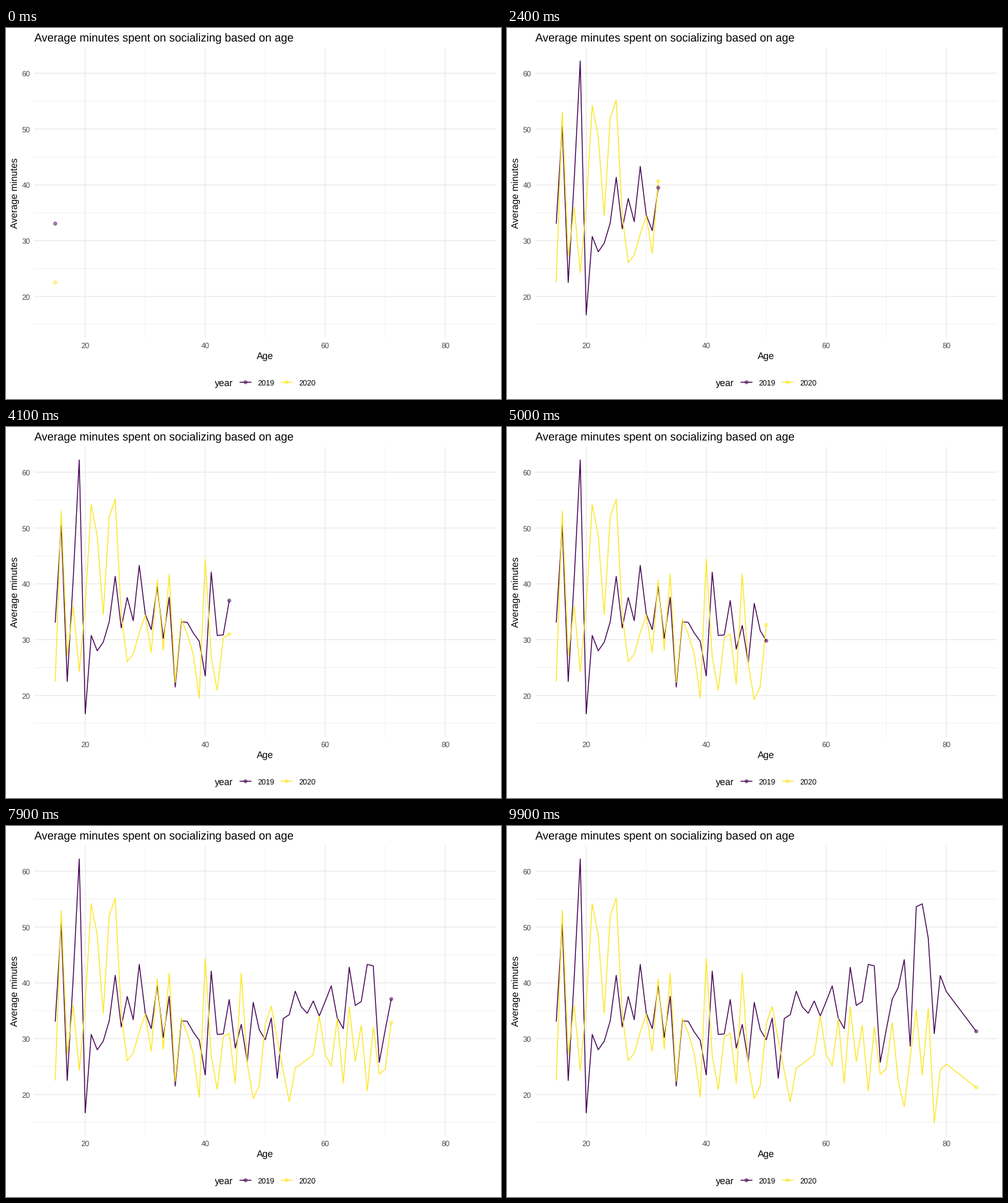
A matplotlib script that plays this animation: 768x576 px, repeating every 10 s.

```python
import matplotlib.pyplot as plt
import numpy as np
from matplotlib.animation import FuncAnimation
from matplotlib.patches import Circle

plt.rcParams.update({
    "font.family": "Liberation Sans",
    "text.hinting": "none",
    "lines.solid_capstyle": "butt",
    "lines.solid_joinstyle": "round",
})

W, H, DPI = 768, 576, 96
FRAMES, INTERVAL = 100, 100
LEFT, RIGHT, TOP, BOTTOM = 43.8, 760.67, 30.7, 481.4
PT = 72 / DPI  # points per pixel
COLORS = {"2019": "#440154", "2020": "#FDE725"}

ages = np.append(np.arange(15, 81), 85)
minutes = {
    "2019": [
        33.05, 50.5, 22.5, 41.0, 62.2, 16.7, 30.75, 28.0, 29.55, 33.2,
        41.35, 32.1, 37.55, 33.4, 43.3, 34.6, 31.8, 39.5, 30.2, 37.6,
        21.5, 33.2, 33.1, 31.2, 29.7, 23.5, 42.1, 30.75, 30.85, 37.0,
        28.3, 32.55, 25.9, 36.5, 31.6, 29.8, 33.7, 22.9, 33.6, 34.3,
        38.5, 35.7, 34.55, 36.75, 34.05, 36.7, 39.45, 33.7, 31.8, 42.8,
        35.95, 36.65, 43.3, 43.05, 25.75, 31.6, 37.1, 39.15, 44.15, 28.65,
        53.65, 54.15, 48.0, 30.9, 41.3, 38.45, 31.3],
    "2020": [
        22.5, 53.0, 27.2, 36.0, 24.3, 36.3, 54.2, 48.6, 34.5, 52.0,
        55.2, 34.4, 26.05, 27.4, 31.2, 34.4, 27.7, 40.7, 28.1, 41.75,
        22.3, 33.7, 31.0, 27.4, 19.5, 44.4, 26.9, 20.9, 30.3, 31.0,
        22.0, 41.75, 25.6, 19.25, 21.6, 32.65, 35.8, 29.8, 24.2, 18.7,
        24.75, 25.5, 26.3, 27.15, 34.05, 27.2, 25.1, 33.6, 22.0, 35.7,
        25.9, 32.4, 20.6, 32.1, 23.6, 24.6, 32.9, 22.3, 17.8, 26.7,
        35.15, 23.45, 35.45, 14.95, 24.4, 25.45, 21.25],
}
# each age is reached on a whole frame
arrival = np.round((ages - 15) / 70 * (FRAMES - 1))


def px(age):
    return LEFT + (np.asarray(age) - 11.5) / 77 * (RIGHT - LEFT)


def py(value):
    return 330.15 - (np.asarray(value) - 30) * 8.665


fig = plt.figure(figsize=(W / DPI, H / DPI), dpi=DPI, facecolor="white")
ax = fig.add_axes([0, 0, 1, 1])
ax.set(xlim=(0, W), ylim=(H, 0))
ax.axis("off")


def line(xs, ys, color, width=1.42, z=2):
    return ax.plot(xs, ys, color=color, lw=width * PT, zorder=z, snap=False)[0]


def dot(x, y, color):
    return ax.add_patch(Circle((x, y), 2.6, facecolor=color, edgecolor=color,
                               lw=0.945 * PT, alpha=0.5, zorder=4))


def label(x, y, text, size, color="black", ha="left", **kw):
    ax.text(x, y, text, fontsize=size, color=color, ha=ha,
            va=kw.pop("va", "baseline"), **kw)


def grid(x_breaks, y_breaks, width, z):
    for x in px(x_breaks):
        line([x, x], [TOP, BOTTOM], "#EBEBEB", width, z)
    for y in py(y_breaks):
        line([LEFT, RIGHT], [y, y], "#EBEBEB", width, z)


grid([30, 50, 70], [15, 25, 35, 45, 55], 0.71, 0)
grid([20, 40, 60, 80], [20, 30, 40, 50, 60], 1.42, 1)

for age in (20, 40, 60, 80):
    label(px(age), 497, str(age), 8.8, "#4D4D4D", "center")
for value in (20, 30, 40, 50, 60):
    label(37.9, py(value) + 4.7, str(value), 8.8, "#4D4D4D", "right")

mid_x, mid_y = (LEFT + RIGHT) / 2, (TOP + BOTTOM) / 2
label(LEFT, 20, "Average minutes spent on socializing based on age", 13.2)
label(mid_x, 514, "Age", 11, ha="center")
label(18, mid_y, "Average minutes", 11, ha="right", va="center",
      rotation=90, rotation_mode="default") if False else ax.text(
    18, mid_y, "Average minutes", fontsize=11, rotation=90,
    rotation_mode="anchor", ha="center", va="baseline")

label(324.2, 556, "year", 11)
for i, (year, color) in enumerate(COLORS.items()):
    x = 371.6 + 63.8 * i
    line([x - 9.2, x + 9.2], [550, 550], color)
    dot(x, 550, color)
    label(x + 18.8, 555, year, 8.8)

paths = {year: line([], [], c, z=3) for year, c in COLORS.items()}
heads = {year: dot(px(15), py(minutes[year][0]), c)
         for year, c in COLORS.items()}


def update(n):
    age = np.interp(n, arrival, ages)
    past = ages < age
    for year, values in minutes.items():
        value = np.interp(age, ages, values)
        xs = np.append(ages[past], age)
        ys = np.append(np.array(values)[past], value)
        paths[year].set_data(px(xs), py(ys))
        heads[year].center = px(age), py(value)
    return [*paths.values(), *heads.values()]


anim = FuncAnimation(fig, update, frames=FRAMES, interval=INTERVAL,
                     repeat=True, repeat_delay=0)
plt.show()
```
